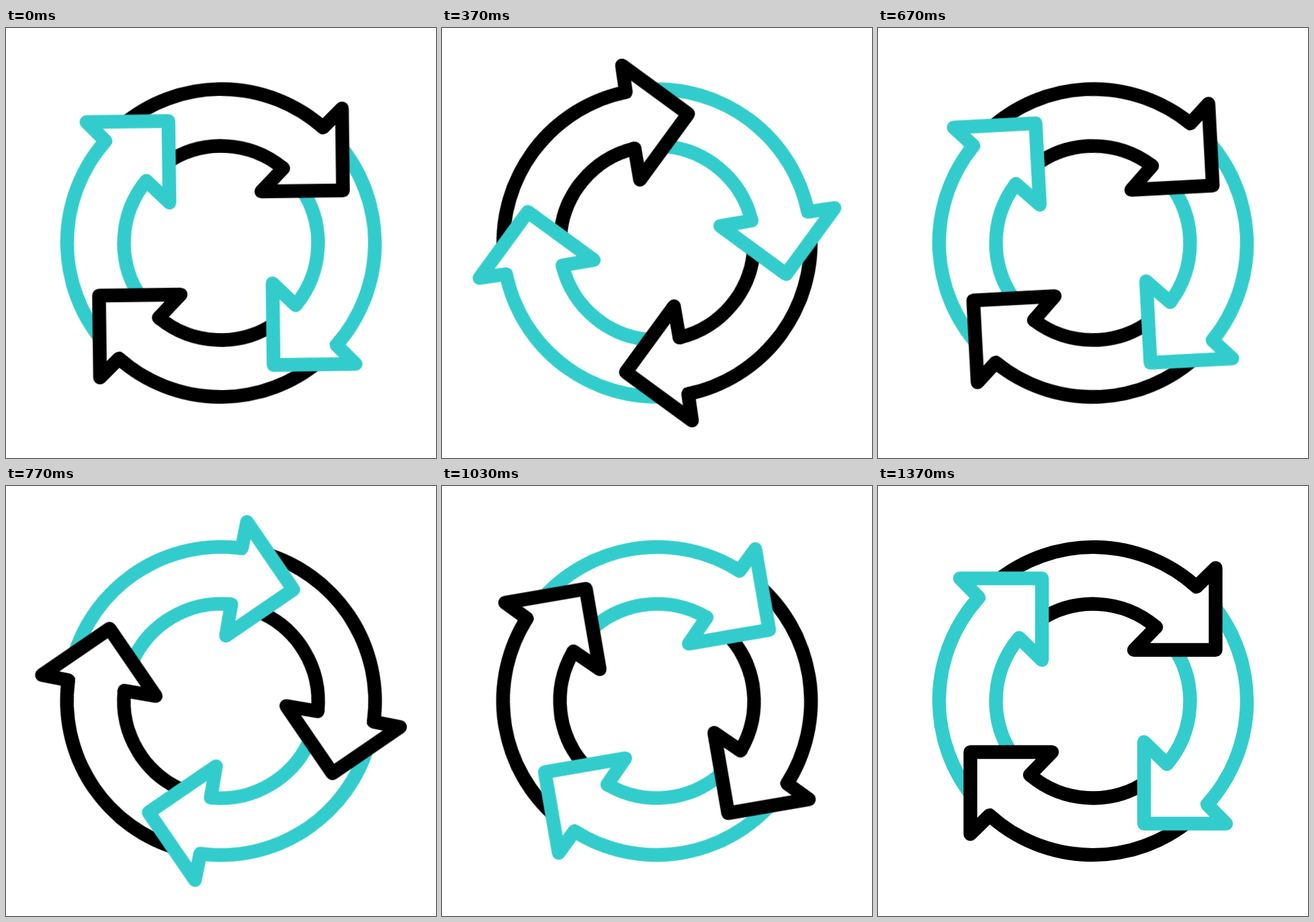
These frames come from a looping animation (640 px wide and 640 px high, 1670 ms). An HTML page:

```html
<!DOCTYPE html>
<html lang="en">
<head>
<meta charset="utf-8">
<title>Cycle arrows</title>
<style>
  html, body { margin: 0; width: 100%; height: 100%; overflow: hidden; background: #fff; }
  svg { display: block; width: 100vw; height: 100vh; }
  .dark { stroke: #000; }
  .teal { stroke: #33cccc; }
  #ring {
    fill: none;
    stroke-width: 20.4;
    stroke-linejoin: round;
    animation: spin 1400ms both paused;
  }
  #head { fill: #fff; stroke-linecap: round; }

  /* wind up backwards, then one full turn */
  @keyframes spin {
    0% { transform: rotate(0deg); animation-timing-function: cubic-bezier(.37, 0, .63, 1); }
    32.74% { transform: rotate(-56deg); animation-timing-function: cubic-bezier(.455, 0, .53, 1); }
    100% { transform: rotate(360deg); }
  }
</style>
</head>
<body>
<svg viewBox="-320 -320 640 640">
  <defs>
    <path id="tail" d="M-145-177A229 229 0 0 1 154-170M-80-120A144.5 144.5 0 0 1 94-110"/>
    <path id="head" d="M154-170L182.5-198V-76H61L94-110"/>
  </defs>
  <g id="ring">
    <use href="#tail" class="dark"/>
    <use href="#tail" class="teal" transform="rotate(90)"/>
    <use href="#tail" class="dark" transform="rotate(180)"/>
    <use href="#tail" class="teal" transform="rotate(270)"/>
    <use href="#head" class="dark"/>
    <use href="#head" class="teal" transform="rotate(90)"/>
    <use href="#head" class="dark" transform="rotate(180)"/>
    <use href="#head" class="teal" transform="rotate(270)"/>
  </g>
</svg>
<script>
  const LOOP = 1670, LAST = 41;
  const spin = document.getElementById('ring').getAnimations()[0];

  // Moves in 30 fps steps aligned to 10 ms ticks, then holds the last pose.
  function draw() {
    const tick = Math.floor((performance.now() % LOOP) / 10);
    const step = Math.min(LAST, Math.floor(tick * 0.3 + 0.11));
    spin.currentTime = (step + 1) * 100 / 3;
    requestAnimationFrame(draw);
  }
  draw();
</script>
</body>
</html>
```
